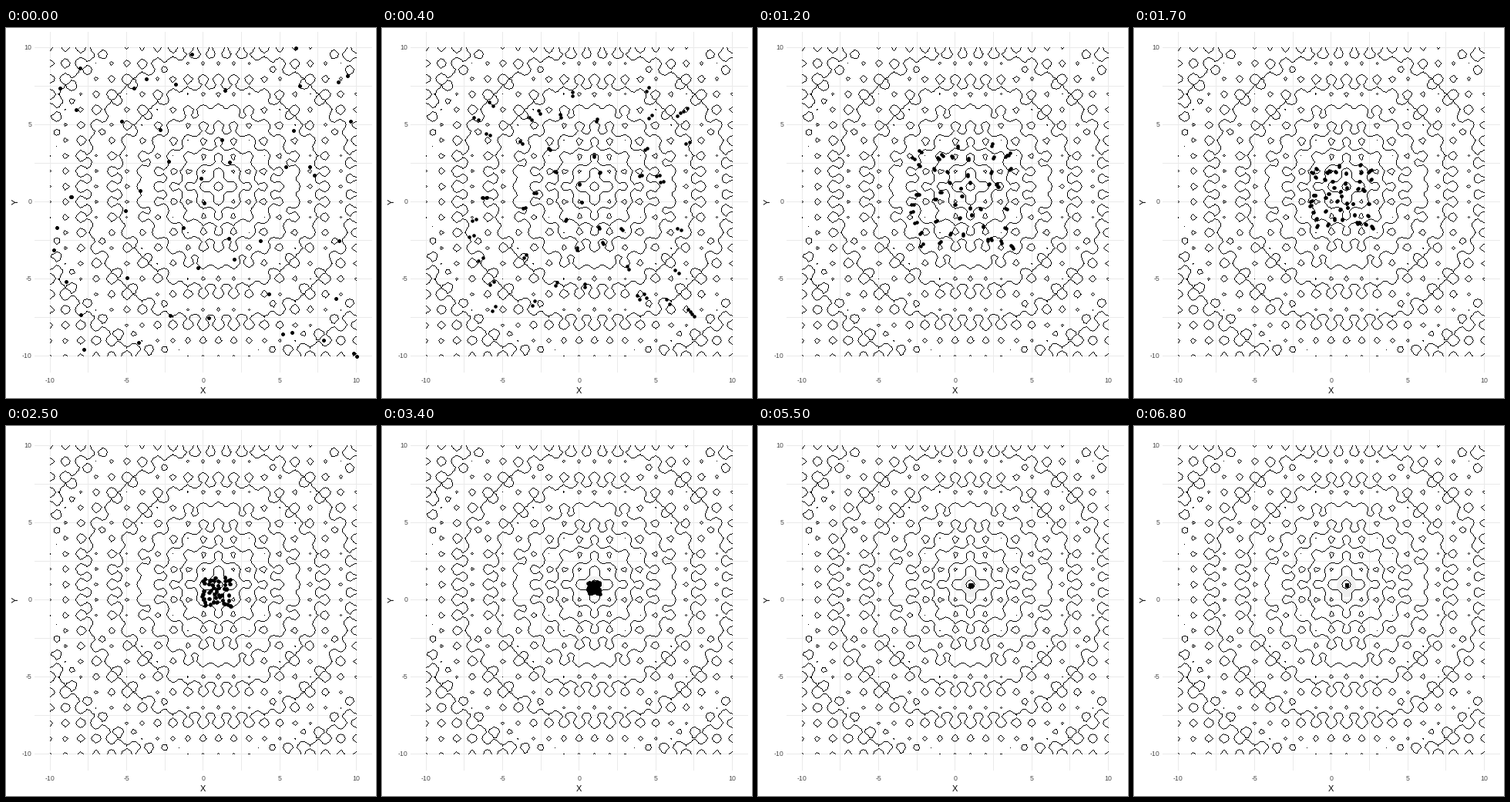
Recreate the animation shown at these times as a matplotlib script. Size 480 px wide and 480 px high, loop 10 s.

```python
import numpy as np
import matplotlib.pyplot as plt
from matplotlib.animation import FuncAnimation
from matplotlib.patches import Ellipse

SIZE, DPI = 480, 96
PX = 72 / DPI                     # one pixel in points
LEFT, RIGHT, TOP, BOTTOM = 37.2, 474.5, 5.5, 446
FONT = "Liberation Sans"

# Scattered swarm: a jittered grid plus a few landmarks
CELLS = 6
LANDMARKS = [(6, 10), (-0.75, 9.6), (9.4, 8.2), (-9.4, 7.4), (-3.75, 8),
             (6.95, 2.3), (-0.15, 1.55), (-8.6, 0.35), (0.05, -0.05),
             (-9.8, -3.1), (-7.8, -9.55), (5.15, -8.55), (9.8, -9.8), (10, -10)]

# Best position so far, and for how many frames the swarm follows it
GOALS = [((0.3, 0.15), 3.25), ((0.05, 1.2), 4), ((1.03, 0.4), 9),
         ((1, 0.7), 8), ((1, 1), np.inf)]
RATE, LAG, STEP = 0.098, 0.75, 0.4


def px_x(x):
    return (LEFT + RIGHT) / 2 + (RIGHT - LEFT) / 22 * x


def px_y(y):
    return (TOP + BOTTOM) / 2 - (BOTTOM - TOP) / 22 * y


def ackley(x, y):
    u, v = x - 1, y - 1
    bowl = -20 * np.exp(-0.2 * np.sqrt((u**2 + v**2) / 2))
    ripple = -np.exp((np.cos(2 * np.pi * u) + np.cos(2 * np.pi * v)) / 2)
    return bowl + ripple + 20 + np.e


def scatter():
    rng = np.random.default_rng(7)
    cell = np.stack(np.meshgrid(np.arange(CELLS), np.arange(CELLS)), -1).reshape(-1, 2)
    spread = (cell + rng.uniform(0.1, 0.9, cell.shape)) * 20 / CELLS - 10
    return np.vstack([spread, LANDMARKS])


def swarm(t):
    """Positions at frame time t: a soft start, then decay towards each goal."""
    t = max(t, 0)
    left = t - LAG * (1 - np.exp(-t / LAG))
    pos = START
    for goal, span in GOALS:
        dt = min(left, span)
        pos = goal + (pos - goal) * np.exp(-RATE * dt)
        left -= dt
    return pos


def stroke(ink, xs, ys, shade):
    """Draw a crisp one-pixel polyline."""
    pts = np.floor(np.column_stack([xs, ys]))
    for a, b in zip(pts[:-1], pts[1:]):
        n = int(np.abs(b - a).max()) + 1
        col, row = np.rint(np.linspace(a, b, n)).astype(int).T
        ink[row, col] = (shade, shade, shade, 1)


START = scatter()

fig = plt.figure(figsize=(SIZE / DPI, SIZE / DPI), dpi=DPI, facecolor="white")
ax = fig.add_axes([0, 0, 1, 1])
ax.axis("off")

ink = np.zeros((SIZE, SIZE, 4))
for v in np.arange(-10, 10.1, 2.5):
    stroke(ink, [px_x(v)] * 2, [TOP, BOTTOM], 0.92)
    stroke(ink, [LEFT, RIGHT], [px_y(v)] * 2, 0.92)

axis = np.linspace(-10, 10, 101)
gx, gy = np.meshgrid(axis, axis)
rings = ax.contour(px_x(gx), px_y(gy), ackley(gx, gy), levels=np.arange(2, 21, 2))
for level in rings.allsegs:
    for line in level:
        stroke(ink, line[:, 0], line[:, 1], 0)
rings.remove()

ax.imshow(ink, extent=(-0.5, SIZE - 0.5, SIZE - 0.5, -0.5), aspect="auto",
          interpolation="nearest", zorder=1)

for v in range(-10, 11, 5):
    label = dict(color="#4d4d4d", fontsize=8.8 * PX, family=FONT, va="center")
    ax.text(px_x(v) - 0.7, 457, str(v), ha="center", **label)
    ax.text(33, px_y(v) - 0.5, str(v), ha="right", **label)

title = dict(color="black", fontsize=11 * PX, family=FONT, ha="center", va="center")
ax.text(px_x(0) - 1, 470, "X", **title)
ax.text(12, px_y(0) - 1, "Y", rotation=90, **title)

halo = ax.add_patch(Ellipse((275, 208), 25, 27, color="#f0f0f0", lw=0, zorder=0))
dots, = ax.plot([], [], "o", color="black", ms=4.6 * PX, mew=0,
                antialiased=False, zorder=3)

ax.set_xlim(-0.5, SIZE - 0.5)
ax.set_ylim(SIZE - 0.5, -0.5)


def draw(i):
    x, y = np.vstack([swarm(i - STEP / 2), swarm(i + STEP / 2) if i else START]).T
    dots.set_data(px_x(x), px_y(y))
    halo.set_visible(i >= 34)
    return dots, halo


anim = FuncAnimation(fig, draw, frames=100, interval=100, repeat=True,
                     repeat_delay=0)
plt.show()
```
